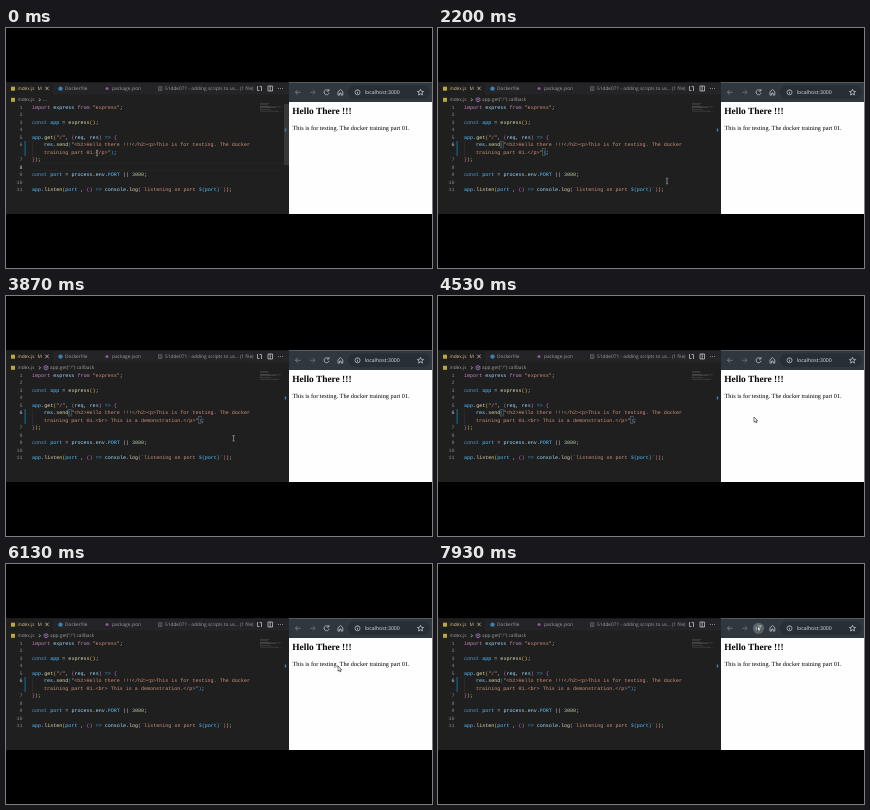
An HTML page that plays this animation: 426 by 240 pixels, repeating every 8 s.

```html
<!DOCTYPE html>
<html lang="en">
<head>
<meta charset="utf-8">
<title>Editor and browser</title>
<style>
html, body { margin: 0; width: 100%; height: 100%; overflow: hidden; background: #000; }
svg { display: block; width: 100vw; height: 100vh; }
text { white-space: pre; text-rendering: geometricPrecision; }
.code { font: 5.05px "Liberation Mono", monospace; }
.ui { font: 4.8px "Open Sans", sans-serif; fill: #9b9b9b; }
.modified { fill: #d8bd8b; }
.page { font-family: "Liberation Serif", serif; fill: #000; }
.line { fill: none; stroke: #c5c8cb; stroke-width: .75; }
</style>
</head>
<body>
<svg id="stage" viewBox="0 0 426 240">
  <rect width="426" height="240"/>
  <rect y="54.5" width="283" height="131.5" fill="#1f1f20"/>
  <rect y="54.5" width="283" height="12" fill="#242426"/>
  <rect y="54.5" width="47" height="12" fill="#1f1f20"/>

  <g class="ui">
    <rect x="5" y="58.7" width="4" height="4" fill="#b9a93c"/>
    <text class="modified" x="11.5" y="62">index.js</text>
    <text class="modified" x="31.5" y="62">M</text>
    <path class="line" d="M39.3 58.7l3.4 3.4m0-3.4l-3.4 3.4"/>
    <circle cx="54.5" cy="60.6" r="2.2" fill="#3d7fae"/>
    <text x="59" y="62">Dockerfile</text>
    <circle cx="101" cy="60.6" r="1.5" fill="#8d56a3"/>
    <text x="106" y="62">package.json</text>
    <path d="M152.5 58.7h3.4v3.8h-3.4zM153.3 60h1.8m-1.8 1.2h1.8" fill="none" stroke="#8b8b8b" stroke-width=".5"/>
    <text x="159" y="62">51dde071 - adding scripts to us... (1 file)</text>
    <rect x="249" y="54.5" width="34" height="12" fill="#242426"/>
    <path class="line" d="M251.5 58v4.5h2M255.5 63v-4.5h-2M262 58h4.5v5h-4.5zM264.2 58v5"/>
    <path d="M272 60.5h1m1 0h1m1 0h1" stroke="#9a9da0" stroke-width=".8"/>
    <rect x="5" y="69.8" width="4" height="4" fill="#b9a93c"/>
    <text x="11.5" y="73.4">index.js</text>
    <path class="line" d="M33 70.3l1.4 1.5-1.4 1.5"/>
    <text id="crumbShort" x="37" y="73.4">...</text>
    <g id="crumbLong">
      <path d="M40 69.5l2 1v2.4l-2 1-2-1v-2.4zM38 70.5l2 1 2-1M40 71.5v2.4" fill="none" stroke="#b180d7" stroke-width=".6"/>
      <text x="44" y="73.4">app.get("/") callback</text>
    </g>
  </g>

  <g id="idle">
    <path d="M25 135.2H278M25 142.6H278" stroke="#29292b" stroke-width=".6"/>
    <rect x="278" y="76" width="5" height="61" fill="#38383a"/>
  </g>
  <path d="M26.3 113V128" stroke="#3c3c3e" stroke-width=".5"/>
  <rect x="18.6" y="113" width="1" height="15" fill="#1b6f92"/>
  <g id="map"></g>
  <rect x="278.7" y="100.5" width="1.6" height="3" fill="#397f9d"/>
  <g id="brackets" fill="none" stroke="#7b7b7b" stroke-width=".4">
    <rect x="62.1" y="113.2" width="3.2" height="6.8"/>
    <rect id="closeBox" y="120.7" width="3.2" height="6.8"/>
  </g>
  <g id="code" class="code"></g>
  <rect id="caret" y="120.8" width=".7" height="6.8" fill="#ddd"/>

  <rect x="283" y="54.5" width="143" height="131.5" fill="#fefeff"/>
  <rect x="283" y="54.5" width="143" height="19.5" fill="#30383f"/>
  <rect x="342" y="57.5" width="82" height="13.5" rx="6.7" fill="#272f36"/>
  <circle id="hover" cx="320.5" cy="64.3" r="5.6" fill="#5b646b"/>
  <path class="line" d="M294.5 64.3h-5m2.3-2.4l-2.4 2.4 2.4 2.4" opacity=".55"/>
  <path class="line" d="M304 64.3h5m-2.3-2.4l2.4 2.4-2.4 2.4" opacity=".4"/>
  <path class="line" d="M322.3 62.5a2.5 2.5 0 1 0 .7 2.3M322.9 61v2h-2"/>
  <path class="line" d="M332 63.8l2.4-2.2 2.4 2.2v3.3h-1.6v-2h-1.6v2H332z"/>
  <circle class="line" cx="351.5" cy="64.3" r="2.5"/>
  <path class="line" d="M351.5 63.8v2M351.5 62.5v.5"/>
  <text class="ui" x="358.8" y="66.2" style="font-size:5.2px;fill:#dde0e2">localhost:3000</text>
  <path class="line" d="M414.5 61.3l.9 2 2.2.2-1.7 1.4.6 2.2-2-1.2-2 1.2.6-2.2-1.7-1.4 2.2-.2z"/>
  <text class="page" x="286.3" y="85.8" font-size="9.42" font-weight="700">Hello There !!!</text>
  <text class="page" x="286.5" y="101.6" font-size="6.28">This is for testing. The docker training part 01.</text>

  <g id="mouse">
    <path id="beam" d="M-1.1-2.7H-.4L0-2.4.4-2.7H1.1M0-2.4V2.4M-1.1 2.7H-.4L0 2.4.4 2.7H1.1" fill="none" stroke="#c4c4c4" stroke-width=".6"/>
    <path id="arrow" d="M-1.5-3V2.2L-.3 1.1.5 2.9 1.4 2.5.7.8H2.3z" fill="#fff" stroke="#222" stroke-width=".6"/>
  </g>
</svg>
<script>
const $ = id => document.getElementById(id);
const LOOP = 8000, CHAR = 3.03, LEFT = 26, INDENT = 38, PITCH = 7.5;
const TYPED = '<br> This is a demonstration.';
const color = {
  k: '#c586c0', c: '#569cd6', v: '#9cdcfe', o: '#4fc1ff', f: '#dcdcaa',
  s: '#ce9178', n: '#b5cea8', w: '#d4d4d4', y: '#e2c53a', m: '#ca70d0', b: '#179fff'
};

function svg(tag, attrs, parent, text = '') {
  const node = document.createElementNS('http://www.w3.org/2000/svg', tag);
  for (const key in attrs) node.setAttribute(key, attrs[key]);
  node.textContent = text;
  return parent.appendChild(node);
}

const baseline = row => 80.7 + row * PITCH;

// Tokens alternate between a colour key and its text.
function codeRow(row, x, ...tokens) {
  const line = svg('text', { x, y: baseline(row) }, $('code'));
  const spans = [];
  for (let i = 0; i < tokens.length; i += 2)
    spans.push(svg('tspan', { fill: color[tokens[i]] }, line, tokens[i + 1]));
  return spans;
}

codeRow(0, LEFT, 'k', 'import ', 'v', 'express ', 'k', 'from ', 's', '"express"', 'w', ';');
codeRow(2, LEFT, 'c', 'const ', 'o', 'app ', 'w', '= ', 'f', 'express', 'y', '()', 'w', ';');
codeRow(4, LEFT, 'o', 'app', 'w', '.', 'f', 'get', 'y', '(', 's', '"/"', 'w', ', ', 'm', '(',
  'v', 'req', 'w', ', ', 'v', 'res', 'm', ') ', 'c', '=> ', 'm', '{');
codeRow(5, INDENT, 'v', 'res', 'w', '.', 'f', 'send', 'b', '(',
  's', '"<h2>Hello there !!!</h2><p>This is for testing. The docker');
const [message] = codeRow(6, INDENT, 's', '', 'b', ')', 'w', ';');
codeRow(7, LEFT, 'm', '}', 'y', ')', 'w', ';');
codeRow(9, LEFT, 'c', 'const ', 'o', 'port ', 'w', '= ', 'v', 'process', 'w', '.', 'v', 'env',
  'w', '.', 'o', 'PORT ', 'w', '|| ', 'n', '3000', 'w', ';');
codeRow(11, LEFT, 'o', 'app', 'w', '.', 'f', 'listen', 'y', '(', 'o', 'port ', 'w', ', ', 'm', '() ',
  'c', '=> ', 'v', 'console', 'w', '.', 'f', 'log', 'm', '(', 's', '`listening on port ',
  'c', '${', 'o', 'port', 'c', '}', 's', '`', 'm', ')', 'y', ')', 'w', ';');

const rowNumbers = [0, 1, 2, 3, 4, 5, 7, 8, 9, 10, 11].map((row, i) =>
  svg('text', { x: 16.5, y: baseline(row), 'text-anchor': 'end', fill: '#858585' }, $('code'), i + 1));

[9, 0, 8, 0, 10, 21, 16, 1, 0, 11, 0, 19].forEach((width, i) =>
  svg('rect', { x: 254, y: 75.2 + i * .7, width, height: .45, fill: '#777', opacity: .65 }, $('map')));

const path = [
  [0, 91, 125], [1300, 91, 125], [1900, 229, 153], [2500, 229, 153], [3050, 209, 146],
  [3700, 209, 146], [4350, 317.5, 124], [5200, 317.5, 124], [5900, 333.5, 105],
  [6700, 333.5, 105], [7500, 321, 65], [LOOP, 321, 65]
];

function mouseAt(t) {
  const i = path.findIndex(step => step[0] > t);
  const [t0, x0, y0] = path[i - 1], [t1, x1, y1] = path[i];
  const p = (t - t0) / (t1 - t0), ease = p * p * (3 - 2 * p);
  return [x0 + (x1 - x0) * ease, y0 + (y1 - y0) * ease];
}

const show = (id, on) => $(id).setAttribute('visibility', on ? 'visible' : 'hidden');

function render(t) {
  const editing = t >= 1250;
  const typed = Math.round(Math.max(0, Math.min(1, (t - 2300) / 850)) * TYPED.length);
  message.textContent = 'training part 01.' + TYPED.slice(0, typed) + '</p>"';

  show('crumbShort', !editing);
  show('crumbLong', editing);
  show('idle', !editing);
  rowNumbers[7].setAttribute('fill', editing ? '#858585' : '#c6c6c6');
  rowNumbers[5].setAttribute('fill', editing ? '#c6c6c6' : '#858585');

  show('brackets', editing && t < 5200);
  $('closeBox').setAttribute('x', INDENT + (22 + typed) * CHAR - .1);
  $('caret').setAttribute('x', INDENT + (17 + typed) * CHAR);
  show('caret', t >= 2300 && t < 3500);

  const [x, y] = mouseAt(t);
  $('mouse').setAttribute('transform', `translate(${x} ${y})`);
  show('beam', x < 278);
  show('arrow', x >= 278);
  show('hover', y < 71);
}

const start = performance.now();
function frame() {
  render((performance.now() - start) % LOOP);
  requestAnimationFrame(frame);
}
frame();
</script>
</body>
</html>
```
